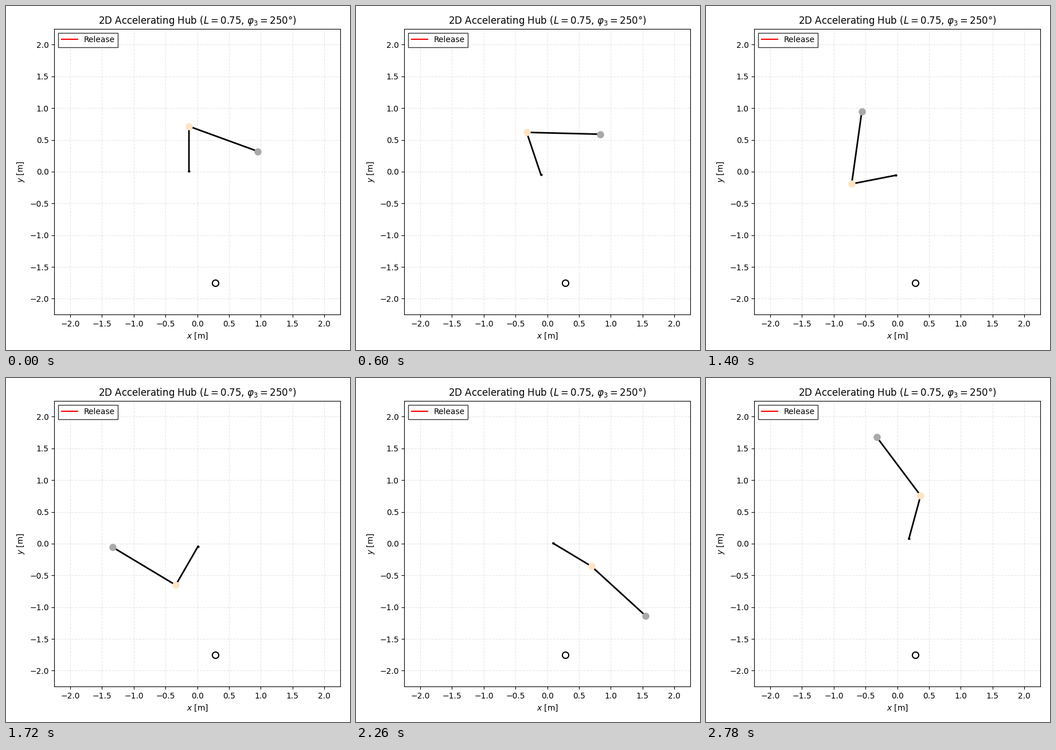
A matplotlib script that plays this animation: 600x600 px, repeating every 2800 ms.

```python
import numpy as np
from numpy.polynomial.polynomial import polyval
import matplotlib.pyplot as plt
from matplotlib.animation import FuncAnimation

SIZE, DPI = 600, 100
FRAMES, STEP = 140, 20
ARM, CLUB = 0.704, 1.155
SPIN = 103.14      # angular acceleration, degrees per s^2
UNLOCK = 1.3       # the joint swings freely from this time on, in s


def polar(length, degrees):
    a = np.radians(degrees)
    return length * np.array([np.cos(a), np.sin(a)])


def pose(t):
    hub = np.array([polyval(t, [-0.131, 0.035, 0.028]),
                    polyval(t, [0.010, -0.1392, 0.0707, -0.0043])])
    turn = SPIN * t ** 2 / 2
    s = max(t - UNLOCK, 0)
    # Once unlocked, the club whips ahead and holds the arm back.
    drag = s ** 3 * polyval(s, [35.15, 0.78, -9.0])
    whip = s ** 2 * polyval(s, [95.03, 0.86, -7.92, -9.1])
    joint = hub + polar(ARM, 90 + turn - drag)
    ball = joint + polar(CLUB, -20 + turn + whip)
    return hub, joint, ball


fig = plt.figure(figsize=(SIZE / DPI, SIZE / DPI), dpi=DPI)
side = 498.5 / SIZE
ax = fig.add_axes([84.38 / SIZE, 61.835 / SIZE, side, side])
ticks = np.arange(-2, 2.1, 0.5)
ax.set(xlim=(-2.25, 2.25), ylim=(-2.25, 2.25), xticks=ticks, yticks=ticks,
       xlabel="$x$ [m]", ylabel="$y$ [m]",
       title=r"2D Accelerating Hub ($L=0.75$, $\varphi_3=250$°)")
ax.grid(linestyle="--", alpha=0.3)
ax.set_axisbelow(True)

ax.plot([], [], color="red", label="Release")
ax.legend(loc="upper left", fancybox=False, edgecolor="black")

ax.plot(0.285, -1.755, "o", ms=8, mfc="none", mec="black", mew=1.5)
rods, = ax.plot([], [], color="black", lw=2)
dots = [ax.plot([], [], "o", color=color, ms=size)[0]
        for color, size in (("black", 2), ("bisque", 8), ("darkgray", 8))]


def draw(frame):
    points = pose(frame * STEP / 1000)
    rods.set_data(*np.transpose(points))
    for dot, (x, y) in zip(dots, points):
        dot.set_data([x], [y])
    return [rods, *dots]


anim = FuncAnimation(fig, draw, frames=FRAMES, interval=STEP,
                     repeat=True, repeat_delay=0)
plt.show()
```
